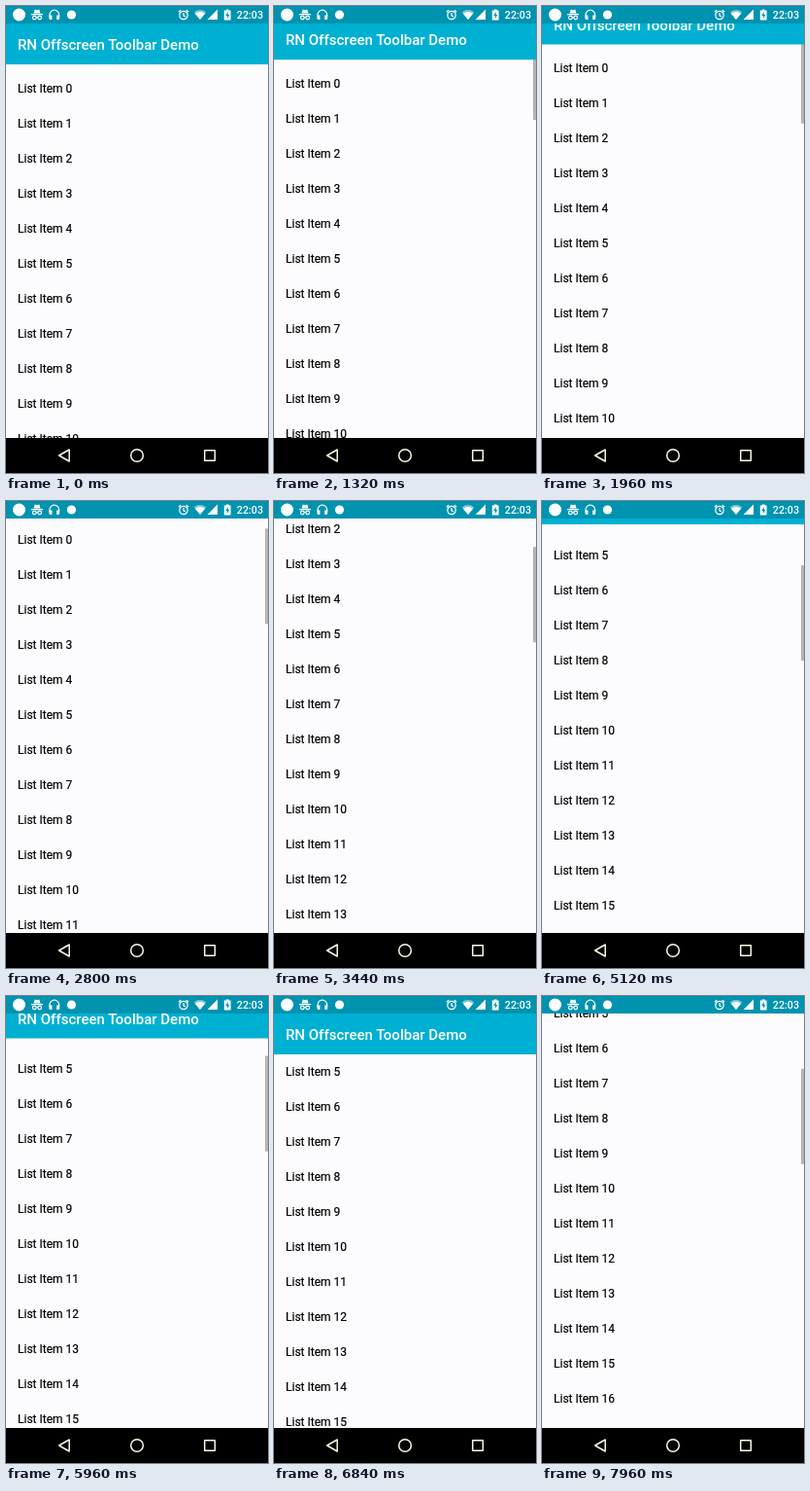
An HTML page that plays this animation: 270x480 px, repeating every 8000 ms.

```html
<!DOCTYPE html>
<html lang="en">
<head>
<meta charset="utf-8">
<title>Offscreen toolbar</title>
<style>
  html, body { margin: 0; width: 100%; height: 100%; overflow: hidden; background: #fcfcfe; }
  svg { display: block; width: 100vw; height: 100vh; font-family: Roboto, sans-serif; }
  #list { font-size: 12px; fill: #000; stroke: #000; stroke-width: .2; }
  .title { font-size: 15px; font-weight: 500; fill: #fff; }
  .clock { font-size: 10.7px; font-weight: 500; fill: #fff; }
  .line { fill: none; stroke: #fff; stroke-width: 1.2; }
  .nav { fill: none; stroke: #fafae0; stroke-width: 1.5; stroke-linejoin: round; }
</style>
</head>
<body>
<svg viewBox="0 0 270 480">
  <rect width="270" height="480" fill="#fcfcfe"/>
  <g id="list"></g>
  <rect id="scrollbar" x="267" width="3" height="98" fill="#b5b5b5"/>

  <g id="toolbar">
    <rect y="18" width="270" height="42" fill="#00b0d2"/>
    <text class="title" x="12" y="45">RN Offscreen Toolbar Demo</text>
  </g>

  <g id="status" fill="#fff">
    <rect width="270" height="18" fill="#0093b0"/>
    <circle cx="13.5" cy="9" r="6.5"/>
    <!-- hat and glasses -->
    <path d="M28.5 7.5 29.7 3.6 32 4.2 34.3 3.6 35.5 7.5ZM26 8h12v1.2H26Z"/>
    <g class="line">
      <circle cx="29.3" cy="12" r="1.8"/>
      <circle cx="34.7" cy="12" r="1.8"/>
      <path d="M31 11.6h2"/>
    </g>
    <!-- headphones -->
    <path class="line" d="M45 11V9a4.8 4.8 0 0 1 9.6 0v2"/>
    <path d="M44.4 9.5h3v4.5h-1.5a1.5 1.5 0 0 1-1.5-1.5ZM55.2 9.5h-3v4.5h1.5a1.5 1.5 0 0 0 1.5-1.5Z"/>
    <circle cx="67.5" cy="9" r="4.6"/>
    <!-- alarm -->
    <g class="line">
      <circle cx="183" cy="9.5" r="4.2"/>
      <path d="M183 7v2.8l2 1.2M177.8 6.2l2.4-2M188.2 6.2l-2.4-2"/>
    </g>
    <!-- wifi -->
    <path d="M193.8 6.4a9.5 9.5 0 0 1 12.4 0L200 14Z" opacity=".5"/>
    <path d="M195 7.9a7.6 7.6 0 0 1 10 0L200 14Z"/>
    <path d="M207.6 14 218 3.6V14Z"/>
    <!-- battery -->
    <path d="M226.8 3.4h2.8v1.2h2V14.4h-6.8V4.6h2Z"/>
    <path d="M228.8 6 226.2 10h1.7v3l2.5-4h-1.6Z" fill="#0093b0"/>
    <text class="clock" x="265" y="13" text-anchor="end">22:03</text>
  </g>

  <rect y="444" width="270" height="36" fill="#000"/>
  <g class="nav">
    <path d="M65.2 456v12L54.6 462Z"/>
    <circle cx="135" cy="462" r="6.3"/>
    <rect x="204.7" y="456.7" width="10.6" height="10.6"/>
  </g>
</svg>
<script>
  const LOOP = 8000, STEP = 40, BAR = 42, ROW = 36;
  const VIEW_TOP = 18, VIEW_RATIO = 426 / 1852;

  // [time in ms, scroll offset in px]
  const drags = [
    [[1120, 0], [1960, 20.5], [2800, 45], [4040, 208], [4200, 215]],
    [[4560, 215], [5120, 209], [5960, 189.5], [6160, 187]],
    [[7600, 187], [7780, 213], [7960, 247]]
  ];

  const byId = id => document.getElementById(id);
  const clamp = (v, lo, hi) => Math.min(hi, Math.max(lo, v));
  const progress = (t, from, to) => clamp((t - from) / (to - from), 0, 1);
  const easeInOut = p => p < .5 ? 2 * p * p : 1 - 2 * (1 - p) ** 2;
  const moveUp = (id, y) => byId(id).setAttribute("transform", `translate(0 ${-y})`);

  // Monotone cubic interpolation
  function along(points, t) {
    const last = points.length - 1;
    if (t >= points[last][0]) return points[last][1];
    const pace = i => (points[i + 1][1] - points[i][1]) / (points[i + 1][0] - points[i][0]);
    const slope = i => {
      if (i === 0) return pace(0);
      if (i === last) return pace(last - 1);
      const a = pace(i - 1), b = pace(i);
      return a * b > 0 ? 2 * a * b / (a + b) : 0;
    };
    const i = points.findIndex((p, k) => t < points[k + 1][0]);
    const [t0, y0] = points[i], [t1, y1] = points[i + 1];
    const h = t1 - t0, u = (t - t0) / h, v = 1 - u;
    return y0 * v * v * (1 + 2 * u) + y1 * u * u * (1 + 2 * v)
      + h * u * v * (slope(i) * v - slope(i + 1) * u);
  }

  function scrollAt(t) {
    const drag = drags.filter(d => t >= d[0][0]).pop();
    return drag ? along(drag, t) : 0;
  }

  // Follows the scroll within its height, then snaps open after a pause
  function toolbarShift(t, scroll) {
    if (t < 4560) return Math.min(BAR, scroll);
    if (t < 7600) return (scroll - 215 + BAR) * (1 - easeInOut(progress(t, 6410, 6830)));
    return Math.min(BAR, scroll - 187);
  }

  function scrollbarOpacity(t) {
    if (t < 1160) return 0;
    return t < 7640 ? 1 - progress(t, 6440, 6720) : 1;
  }

  function draw(t) {
    const scroll = scrollAt(t);
    moveUp("list", scroll);
    moveUp("toolbar", toolbarShift(t, scroll));
    byId("scrollbar").setAttribute("y", VIEW_TOP + scroll * VIEW_RATIO);
    byId("scrollbar").setAttribute("opacity", scrollbarOpacity(t));
  }

  byId("list").innerHTML = Array.from({ length: 20 }, (_, i) =>
    `<text x="12" y="${88.6 + i * ROW}">List Item ${i}</text>`).join("");

  const start = performance.now();
  function tick() {
    const t = (performance.now() - start) % LOOP;
    draw(Math.floor(t / STEP) * STEP);
    requestAnimationFrame(tick);
  }
  draw(0);
  requestAnimationFrame(tick);
</script>
</body>
</html>
```
